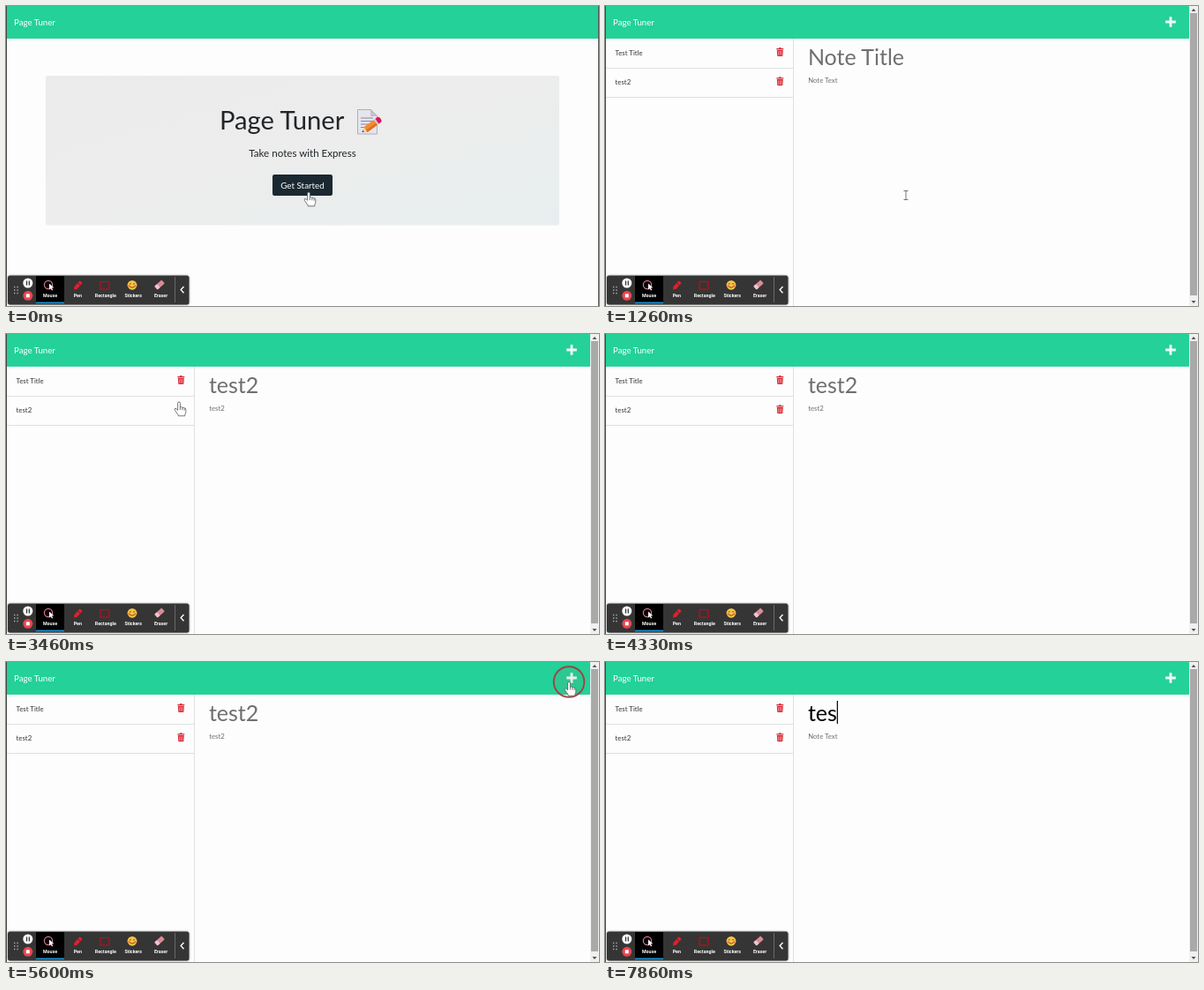
Recreate the animation shown at these times as an HTML page. Size 672 by 340 pixels, loop 8 s.

```html
<!DOCTYPE html>
<html lang="en">
<head>
<meta charset="utf-8">
<title>Page Tuner</title>
<style>
  html, body { margin: 0; width: 100%; height: 100%; overflow: hidden; background: #fdfdfd; }
  svg { display: block; width: 672px; height: 340px; font-family: Lato, sans-serif; }
  .small { font-size: 7.8px; fill: #333; }
  .grey { fill: #6f6f6f; }
  .labels { font: bold 5.3px Roboto, sans-serif; fill: #fff; text-anchor: middle; }
  .cursor { fill: #fff; stroke: #555; stroke-width: .8; stroke-linejoin: round; }
</style>
</head>
<body>
<svg viewBox="0 0 672 340">
  <defs>
    <linearGradient id="panel" x2="1" y2="1">
      <stop stop-color="#ebebeb"/><stop offset=".5" stop-color="#ecedec"/><stop offset="1" stop-color="#e8eeef"/>
    </linearGradient>
    <filter id="shadow" x="-5%" y="-20%" width="110%" height="140%">
      <feDropShadow dx="0" dy="0" stdDeviation="1.2" flood-opacity=".45"/>
    </filter>
    <g id="trash" fill="#d9303c">
      <path d="M-4-4h2.5l.6-1h1.8l.6 1H4v1.2h-8z"/>
      <path d="M-3.5-2.2h7L3.1 4.2q-.1.8-.9.8h-4.4q-.8 0-.9-.8z"/>
      <path d="M-1.7-1v4.8M0-1v4.8M1.7-1v4.8" stroke="#f7c5c8" stroke-width=".6"/>
    </g>
  </defs>

  <rect width="672" height="340" fill="#fdfdfd"/>
  <rect width="672" height="37" fill="#24d198"/>
  <text x="9" y="22.3" font-size="9.7" fill="#fff">Page Tuner</text>

  <g id="landing">
    <rect x="45" y="79" width="582" height="169.5" rx="2.5" fill="url(#panel)"/>
    <text x="242" y="140.4" font-size="29.2" fill="#212529">Page Tuner</text>
    <g stroke-linejoin="round">
      <path d="M398.5 117.5h15l7 7v20.5h-22z" fill="#e4e6ee" stroke="#b5aabd"/>
      <path d="M413.5 117.5v7h7z" fill="#c9c0d2" stroke="#b5aabd" stroke-width=".6"/>
      <path d="M402 127h14M402 130.5h14M402 134h11M402 137.5h6" stroke="#8d829f" stroke-width="1.2"/>
      <g transform="translate(403.5 143) rotate(-36)">
        <path d="M0 0l5-3.5v7z" fill="#f6d3a4"/>
        <path d="M0 0l2-1.4v2.8z" fill="#4a3b45"/>
        <path d="M5-3.5h14v7H5z" fill="#f58c2e"/>
        <path d="M5 .8h14v2.7H5z" fill="#e0701c"/>
        <path d="M19-3.5h2v7h-2z" fill="#c9c6d4"/>
        <path d="M21-3.5h2.5q2.5 0 2.5 3.5t-2.5 3.5H21z" fill="#df1250"/>
      </g>
    </g>
    <text x="336" y="171.3" font-size="11.6" fill="#212529" text-anchor="middle">Take notes with Express</text>
    <rect id="focus" x="301" y="190" width="70" height="26" rx="3" fill="#8e959b"/>
    <rect x="302" y="191" width="68" height="24" rx="2.2" fill="#1a2832"/>
    <text x="336" y="206.8" font-size="9.8" fill="#fff" text-anchor="middle">Get Started</text>
    <path d="M671.5 0v340" stroke="#555"/>
  </g>

  <g id="notes">
    <path d="M1 70.5h212M1 103.5h212M213.5 37v303" stroke="#dfe1e1"/>
    <text class="small" x="11.6" y="56.2">Test Title</text>
    <text class="small" x="11.6" y="89.2">test2</text>
    <use href="#trash" x="198.3" y="52"/>
    <use id="trash2" href="#trash" x="198.3" y="85.3"/>
    <path d="M641 12.2v11.6M635.2 18h11.6" stroke="#effcf7" stroke-width="2.8"/>
    <text id="title" x="229.9" y="66.8" font-size="25"></text>
    <text id="body" class="small grey" x="230.2" y="86.8"></text>
    <rect id="caret" y="44" width="1.2" height="26"/>
    <rect x="662" width="10" height="340" fill="#f0f0f0"/>
    <rect x="663" y="8" width="8" height="320" fill="#a9a9a9"/>
    <path d="M664.5 6l2.5-3 2.5 3zM664.5 334l2.5 3 2.5-3z" fill="#555"/>
  </g>

  <path d="M.5 0v340" stroke="#444"/>

  <g id="toolbar">
    <rect x="2" y="305.5" width="205.5" height="33" rx="2.5" fill="#343434" filter="url(#shadow)"/>
    <path d="M9 318.5h5M9 322h5M9 325.5h5" stroke="#aaa" stroke-width="1.4" stroke-dasharray="1.4 2"/>
    <circle cx="24.8" cy="314" r="5.5" fill="#fff"/>
    <path d="M23.5 311.6v4.8M26.3 311.6v4.8" stroke="#333" stroke-width="1.3"/>
    <circle cx="24.8" cy="328.3" r="5.5" fill="#e8454f"/>
    <rect x="22.8" y="326.3" width="4" height="4" fill="#fff"/>
    <rect x="34" y="306" width="32" height="31" fill="#000"/>
    <rect x="34" y="335.5" width="32" height="1.7" fill="#1d8fd1"/>
    <circle cx="48" cy="316" r="4.6" fill="none" stroke="#d9788b" stroke-width="1.2"/>
    <path d="M49 314.5l5.3 4.7-2.4.2 1.3 2.4-1.2.6-1.2-2.5-1.8 1.5z" fill="#fff"/>
    <g transform="translate(77 321.5) rotate(-47)">
      <path d="M0 0l3-2h5v4H3z" fill="#e3202e"/><path d="M8.7-2h3.3v4H8.7z" fill="#e3202e"/>
    </g>
    <rect x="107" y="312.5" width="10" height="8.5" fill="none" stroke="#b3101c" stroke-width="1.3"/>
    <circle cx="143" cy="316.3" r="5.4" fill="#f6c544"/>
    <path d="M139.8 315.2q1-1.4 2 0M144.2 315.2q1-1.4 2 0M140.5 318q2.5 2.5 5 0" fill="none" stroke="#6d3d12" stroke-width=".9"/>
    <path d="M138.6 317.5h2M145.4 317.5h2" stroke="#ee5a45" stroke-width="1.8"/>
    <g transform="translate(174 316) rotate(-42)">
      <rect x="-5.5" y="-2.6" width="11" height="5.2" rx="1" fill="#d98a99"/>
      <rect x="-5.5" y="-2.6" width="4" height="5.2" rx="1" fill="#f0c3ca"/>
    </g>
    <g class="labels">
      <text x="50" y="329.8">Mouse</text><text x="81.3" y="329.8">Pen</text>
      <text x="112.8" y="329.8">Rectangle</text><text x="144.2" y="329.8">Stickers</text>
      <text x="175.5" y="329.8">Eraser</text>
    </g>
    <path d="M191.5 307v29" stroke="#686868"/>
    <path d="M201.5 318l-3.3 3.6 3.3 3.6" fill="none" stroke="#fff" stroke-width="1.4"/>
  </g>

  <circle id="ring" r="17.3" fill="#a33" fill-opacity=".06" stroke="#a5393c" stroke-opacity=".9" stroke-width="1.9"/>
  <path id="cursor" class="cursor"/>
</svg>
<script>
const LOOP = 8000;
const $ = id => document.getElementById(id);
const show = (id, on) => $(id).setAttribute('visibility', on ? 'visible' : 'hidden');

// time, x, y of the pointer tip
const path = [
  [0, 343, 211], [60, 343, 211], [600, 341, 209.5], [2130, 341, 209.5],
  [2460, 60, 87], [3000, 60, 87], [3400, 196, 77], [3530, 196, 77],
  [3730, 225, 112], [3930, 225, 112], [4330, 685, -20], [4730, 685, -20],
  [5500, 638, 22.5], [5960, 638, 22.5], [6130, 270, 58], [LOOP, 270, 58]
];
const clicks = [2630, 5580, 6460];
const shapes = {
  hand: 'M-1.4 1.4a1.4 1.4 0 0 1 2.8 0V6q1.4-1 2.4.4 1.6-.8 2.3.6 1.7-.3 1.7 1.3v3q0 1.6-1 3v1.5H-.8v-1L-4.6 9.5q-1-1.9.5-2.2 1.3 0 2.7 2.1zM1.4 6v3M3.8 6.6v2.6M6.1 7.2V9.6',
  arrow: 'M0 0v13l3-2.8 2 4.6 2-.9-2-4.4h4.2z',
  beam: 'M-2.5 0h5M0 0v10M-2.5 10h5'
};

function pointerAt(t) {
  const i = path.findIndex(key => key[0] > t);
  const [t0, x0, y0] = path[i - 1], [t1, x1, y1] = path[i];
  const p = (t - t0) / (t1 - t0), e = p * p * (3 - 2 * p);
  return [x0 + (x1 - x0) * e, y0 + (y1 - y0) * e];
}

function pointerShape(x, y, landing) {
  if (landing || (x < 213 && y > 37 && y < 104) || (Math.abs(x - 641) < 12 && y > 8 && y < 32)) return 'hand';
  return x > 228 && y > 40 ? 'beam' : 'arrow';
}

function draw(t) {
  const landing = t < 800;
  const selected = t >= 2800 && t < 5730;
  const typed = 'tes'.slice(0, [7330, 7600, 7860].filter(k => t >= k).length);
  show('landing', landing);
  show('notes', !landing);
  $('focus').setAttribute('opacity', t >= 590 ? 1 : 0);
  $('trash2').setAttribute('opacity', t >= 3330 && t < 3600 ? 0 : 1);

  const title = $('title');
  title.textContent = typed || (selected ? 'test2' : 'Note Title');
  title.setAttribute('fill', typed ? '#000' : '#6f6f6f');
  $('body').textContent = selected ? 'test2' : 'Note Text';

  const caretOn = typed || (t >= 6460 && t < 7000);
  $('caret').setAttribute('x', 229.8 + (typed ? title.getComputedTextLength() : 0));
  $('caret').setAttribute('opacity', caretOn ? 1 : 0);

  const [x, y] = pointerAt(t);
  const place = `translate(${x} ${y})`;
  $('ring').setAttribute('transform', place);
  show('ring', clicks.some(c => t >= c && t < c + 190));
  $('cursor').setAttribute('transform', place);
  $('cursor').setAttribute('d', shapes[pointerShape(x, y, landing)]);
  show('cursor', !typed);
}

function tick() {
  draw(performance.now() % LOOP);
  requestAnimationFrame(tick);
}
tick();
</script>
</body>
</html>
```
